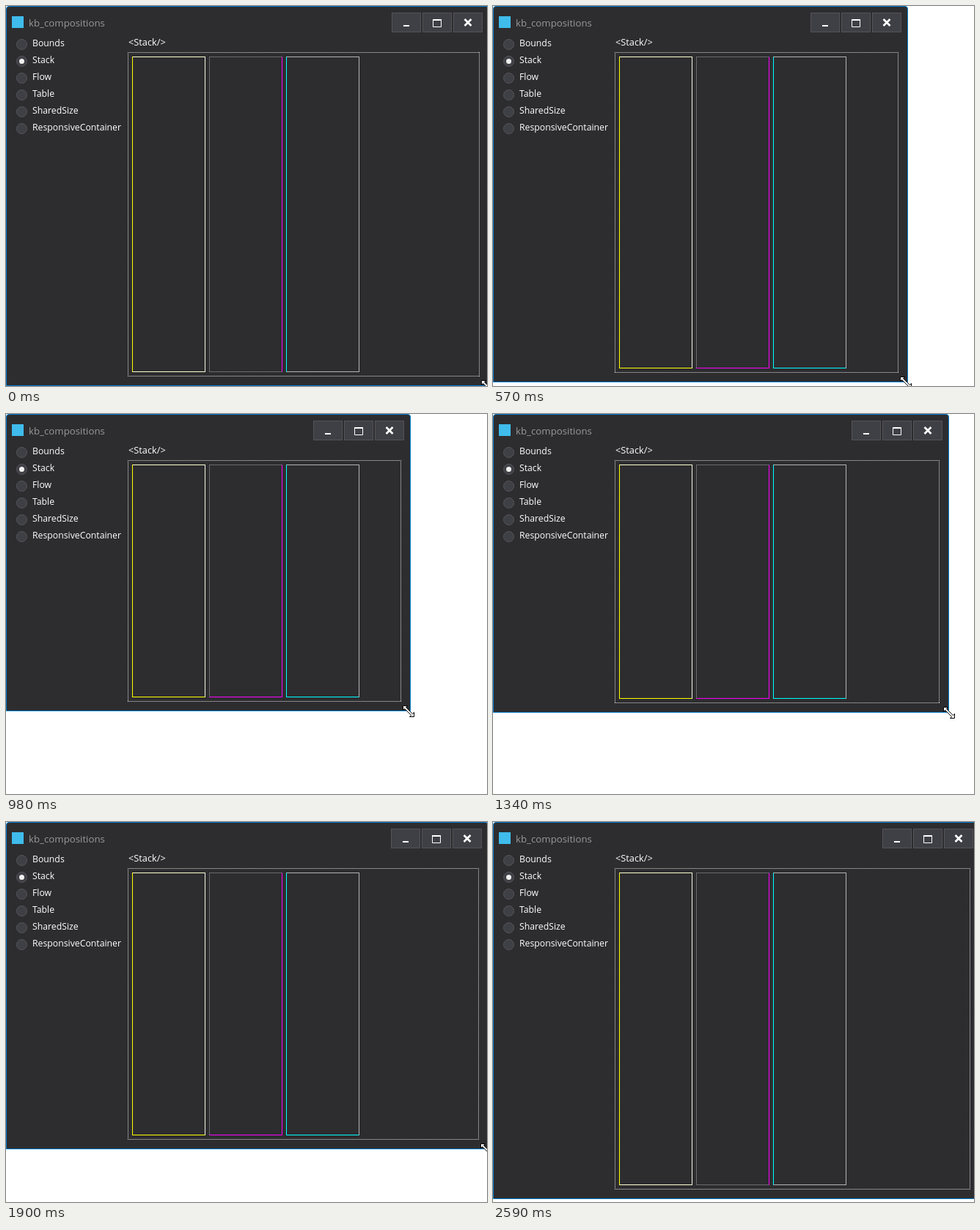
An HTML page for the animation above (3.15 s loop, 656 px wide and 519 px high).

```html
<!DOCTYPE html>
<html lang="en">
<head>
<meta charset="utf-8">
<title>kb_compositions</title>
<style>
html, body { margin: 0; width: 100%; height: 100%; overflow: hidden; background: #fff; }
body { position: relative; }
div, span, svg { position: absolute; box-sizing: border-box; }
span { font: 12.25px/20px "Open Sans", "Noto Sans", sans-serif; color: #fff; white-space: nowrap; }
#win { left: 0; top: 0; background: #2d2d30; border: 1px solid #007acc; border-radius: 4px 4px 0 0; }
#win > * { margin: -1px; } /* measure from the outer edge of the border */
#icon { left: 8px; top: 14px; width: 16px; height: 16px; background: #3fbcec; }
#title { left: 31px; top: 13px; font-size: 13.25px; color: #999; }
#tag { left: 167px; top: 39px; font-size: 12.8px; }
.radio { left: 14px; width: 15px; height: 15px; border: 1px solid #55555a; border-radius: 50%; background: #3f3f46; }
.radio.on::after { content: ""; position: absolute; left: 3px; top: 3px; width: 7px; height: 7px; border-radius: 50%; background: #f1f1f1; }
.button { top: 9px; width: 40px; height: 27px; background: #3f3f46; border: 1px solid #535358; }
.button svg { left: -1px; top: -1px; }
#area {
  --h: repeating-linear-gradient(90deg, #ddd 0 1px, transparent 1px 2px);
  --v: repeating-linear-gradient(#ddd 0 1px, transparent 1px 2px);
  left: 166px; top: 63px; right: 13px; bottom: 13px;
  background: var(--h) top / 100% 1px, var(--h) bottom / 100% 1px, var(--v) left / 1px 100%, var(--v) right / 1px 100%;
  background-repeat: no-repeat;
}
.column { top: 69px; bottom: 19px; width: 100px; border: 1px solid; }
</style>
</head>
<body>
<div id="win">
  <div id="icon"></div>
  <span id="title">kb_compositions</span>
  <span id="tag">&lt;Stack/&gt;</span>
  <div id="area"></div>
</div>
<svg id="cursor" width="17" height="17">
  <path d="M.5 .5H6.5L4.5 2.7L13.5 11.7L15.5 9.5V15.5H9.5L11.7 13.5L2.7 4.5L.5 6.5Z" fill="#fff" stroke="#000"/>
</svg>
<script>
const LOOP = 3150;
const win = document.getElementById('win');
const cursor = document.getElementById('cursor');

function add(tag, className, style, html = '') {
  const el = document.createElement(tag);
  el.className = className;
  el.innerHTML = html;
  Object.assign(el.style, style);
  win.append(el);
  return el;
}

['Bounds', 'Stack', 'Flow', 'Table', 'SharedSize', 'ResponsiveContainer'].forEach((name, i) => {
  add('div', i === 1 ? 'radio on' : 'radio', { top: 45 + 23 * i + 'px' });
  add('span', '', { left: '36px', top: 41 + 23 * i + 'px' }, name);
});

[
  '<path d="M16 18H24" stroke-width="2"/>',
  '<path d="M14.5 10V19.5H25.5V10"/><path d="M14 10H26" stroke-width="2"/>',
  '<path d="M15.5 9L24.5 18M24.5 9L15.5 18" stroke-width="2.6"/>'
].forEach((shape, i) => add('div', 'button', { right: 93 - 42 * i + 'px' },
  `<svg width="40" height="27" fill="none" stroke="#fff">${shape}</svg>`));

// Border colours: top, right, bottom, left; then the bottom edge during a resize
const columns = [
  ['#ffffd0 #f4f4e4 #ffffd0 #ff0', '#ff0'],
  ['#6a6a6a #f0f #6a6a6a #6a6a6a', '#f0f'],
  ['#b4b4b4 #b4b4b4 #b4b4b4 #0ff', '#0ff']
].map(([rest, active], i) => ({
  rest, active, el: add('div', 'column', { left: 172 + 105 * i + 'px' })
}));

// Drag legs: first step, last step (ms), step count, window size and cursor lead at the end
const start = [659, 519, 0];
const legs = [
  [160, 570, 11, 566, 514, 0],
  [610, 640, 2, 564, 513, 0],
  [730, 980, 7, 552, 406, 0],
  [1130, 1340, 6, 622, 408, 3],
  [1370, 1640, 6, 650, 409, 0],
  [1670, 1770, 3, 654, 412, 0],
  [1810, 2060, 7, 663, 500, 0],
  [2110, 2190, 2, 663, 502, 0],
  [2230, 2310, 3, 664, 515, 0]
];

function pose(t) {
  let from = start;
  for (const [first, last, count, ...to] of legs) {
    if (t < first) break;
    const step = (last - first) / (count - 1);
    const u = Math.min(1, (Math.floor((t - first) / step + 1e-6) + 1) / count);
    const ease = u * u * (3 - 2 * u);
    const now = to.map((v, i) => Math.round(from[i] + (v - from[i]) * ease));
    if (u < 1) return now;
    from = to;
  }
  return from;
}

function draw(t) {
  const [w, h, lead] = pose(t);
  win.style.width = w + 'px';
  win.style.height = h + 'px';
  const resizing = t >= 160 && t < 2230;
  for (const { el, rest, active } of columns) {
    el.style.borderColor = rest;
    if (resizing) el.style.borderBottomColor = active;
  }
  cursor.style.left = w - 11 + lead + 'px';
  cursor.style.top = h - 8 + 'px';
  cursor.style.display = t < 2590 ? '' : 'none';
}

const begin = performance.now();
function tick() {
  draw((performance.now() - begin) % LOOP);
  requestAnimationFrame(tick);
}
tick();
</script>
</body>
</html>
```
